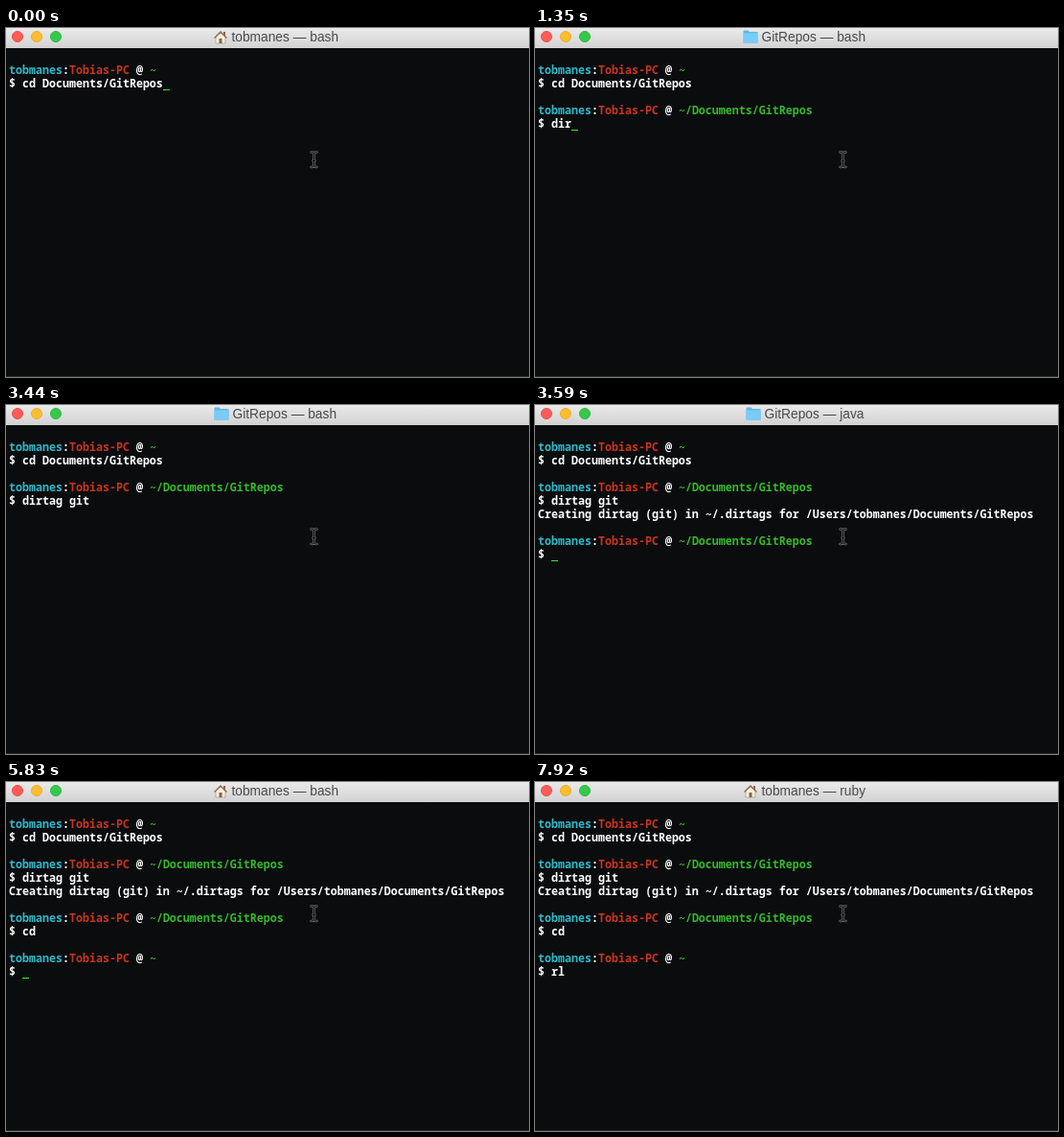
These frames come from a looping animation (546x364 px, 8 s). An HTML page:

```html
<!DOCTYPE html>
<html lang="en">
<head>
<meta charset="utf-8">
<title>Terminal</title>
<style>
  html, body { margin: 0; width: 100%; height: 100%; overflow: hidden; background: #0b0c0e; }
  #stage { position: relative; width: 546px; height: 364px; overflow: hidden; background: #0b0c0e; }
  #stage::after { content: ""; position: absolute; left: 0; right: 0; top: 363px; height: 1px; background: #1d2c2b; }
  #bar { position: absolute; left: 0; top: 0; width: 546px; height: 21px; background: linear-gradient(#eaeaea, #d2d2d2); }
  #bar i { position: absolute; top: 3px; width: 12px; height: 12px; border-radius: 50%; box-sizing: border-box; }
  #title { position: absolute; top: 1px; font: 13.75px/17px "Liberation Sans", Arial, sans-serif; color: #4a4a4a; white-space: pre; }
  svg { position: absolute; overflow: visible; }
  .block { position: absolute; left: 3px; white-space: pre; color: #fff;
           font: bold 11.667px/14px "Noto Sans Mono", monospace; font-variant-ligatures: none; }
  .block div { height: 14px; }
  .user { color: #2fb9c9; }
  .host { color: #c8351f; }
  .path { color: #35b92c; }
  #caret { position: absolute; width: 7px; height: 1px; background: #33f02f; }
</style>
</head>
<body>
<div id="stage">
  <div id="bar">
    <i style="left:6px;background:#fc5b57;border:1px solid #ee4f4a"></i>
    <i style="left:26px;background:#fdbd30;border:1px solid #eeae28"></i>
    <i style="left:46px;background:#34c94a;border:1px solid #2cba40"></i>
    <svg id="home" style="top:3px" width="14" height="13">
      <path d="M10 1h2v4h-2z" fill="#85694f"/>
      <path d="M2 6.500 7 2 12 6.500V13H2z" fill="#f4efe4" stroke="#a59a88" stroke-width=".7"/>
      <path d="M5.500 8h3v5h-3z" fill="#8a6238"/>
      <path d="M.5 7.500 7 1l6.500 6.500" fill="none" stroke="#94694a" stroke-width="1.400"/>
    </svg>
    <svg id="folder" style="top:2px" width="16" height="14">
      <path d="M.5 1.500Q.5.5 1.500.5H5.500L7 2H14.500Q15.500 2 15.500 3V13Q15.500 14 14.500 14H1.500Q.5 14 .5 13Z" fill="#5fbae6"/>
      <path d="M.5 3.500H15.500V13Q15.500 14 14.500 14H1.500Q.5 14 .5 13Z" fill="#7accf6"/>
    </svg>
    <span id="title"></span>
  </div>
  <div id="screen"></div>
  <div id="caret"></div>
  <svg style="left:317px;top:128px" width="10" height="19" fill="none" stroke-linecap="round">
    <defs>
      <path id="beam" d="M1.500 1.500H2.500Q4.500 1.500 4.500 3.500Q4.500 1.500 6.500 1.500H7.500M4.500 3.500V15.500M1.500 17H2.500Q4.500 17 4.500 15Q4.500 17 6.500 17H7.500M3.500 10.500H5.500"/>
    </defs>
    <use href="#beam" stroke="#6c6c6c" stroke-width="2.500"/>
    <use href="#beam" stroke="#111"/>
  </svg>
</div>
<script>
const LOOP = 8000, COL = 7, ROW = 14, LEFT = 3, TOP = 37;
const USER = 'tobmanes', HOST = 'Tobias-PC', REPOS = '~/Documents/GitRepos';
const $ = id => document.getElementById(id);

// Prompt blocks: first row, working directory, command, output
const blocks = [
  { row: 0, path: '~', cmd: 'cd Documents/GitRepos' },
  { row: 3, path: REPOS, cmd: 'dirtag git',
    out: `Creating dirtag (git) in ~/.dirtags for /Users/${USER}/Documents/GitRepos` },
  { row: 7, path: REPOS, cmd: 'cd' },
  { row: 10, path: '~', cmd: 'rl' }
];

// Window titles: icon, icon x, text x, text
const titles = {
  home: ['home', 217, 235.5, USER + ' — bash'],
  repos: ['folder', 217, 236.5, 'GitRepos — bash'],
  java: ['folder', 220, 239.5, 'GitRepos — java'],
  ruby: ['home', 218, 236.5, USER + ' — ruby']
};

// Start time, title, active block, typed characters, caret shown
const steps = [
  [0, 'home', 0, 21, 1],
  [150, 'repos', 1, 0, 1],
  [900, 'repos', 1, 1, 1],
  [1050, 'repos', 1, 2, 1],
  [1200, 'repos', 1, 3, 1],
  [1500, 'repos', 1, 5, 1],
  [1650, 'repos', 1, 6, 1],
  [1800, 'repos', 1, 7, 1],
  [2400, 'repos', 1, 8, 1],
  [2700, 'repos', 1, 10, 1],
  [3440, 'repos', 1, 10, 0],
  [3590, 'java', 2, 0, 1],
  [3740, 'repos', 2, 0, 1],
  [4640, 'repos', 2, 0, 0],
  [5090, 'repos', 2, 0, 1],
  [5230, 'repos', 2, 2, 1],
  [5830, 'home', 3, 0, 1],
  [6580, 'home', 3, 0, 0],
  [6880, 'home', 3, 1, 1],
  [7030, 'home', 3, 2, 1],
  [7770, 'home', 3, 2, 0],
  [7920, 'ruby', 3, 2, 0]
];

for (const b of blocks) {
  b.el = document.createElement('div');
  b.el.className = 'block';
  b.el.style.top = TOP + b.row * ROW + 'px';
  b.el.innerHTML =
    `<div><span class="user">${USER}</span>:<span class="host">${HOST}</span> @ <span class="path">${b.path}</span></div>` +
    `<div></div><div>${b.out || ''}</div>`;
  [, b.input, b.output] = b.el.children;
  $('screen').append(b.el);
}

function show([, title, active, typed, caret]) {
  const [icon, iconX, textX, text] = titles[title];
  for (const id of ['home', 'folder']) {
    $(id).style.display = id === icon ? '' : 'none';
    $(id).style.left = iconX + 'px';
  }
  $('title').style.left = textX + 'px';
  $('title').textContent = text;

  blocks.forEach((b, i) => {
    b.el.style.display = i <= active ? '' : 'none';
    b.output.style.visibility = i < active ? 'visible' : 'hidden';
    b.input.textContent = '$ ' + (i < active ? b.cmd : b.cmd.slice(0, typed));
  });

  const style = $('caret').style;
  style.visibility = caret ? 'visible' : 'hidden';
  style.left = LEFT + (2 + typed) * COL + 'px';
  style.top = TOP + (blocks[active].row + 2) * ROW - 1 + 'px';
}

let current;
const start = performance.now();
function tick() {
  const t = (performance.now() - start) % LOOP;
  const step = steps.findLast(s => s[0] <= t) || steps[0];
  if (step !== current) show(current = step);
  requestAnimationFrame(tick);
}
tick();
</script>
</body>
</html>
```
